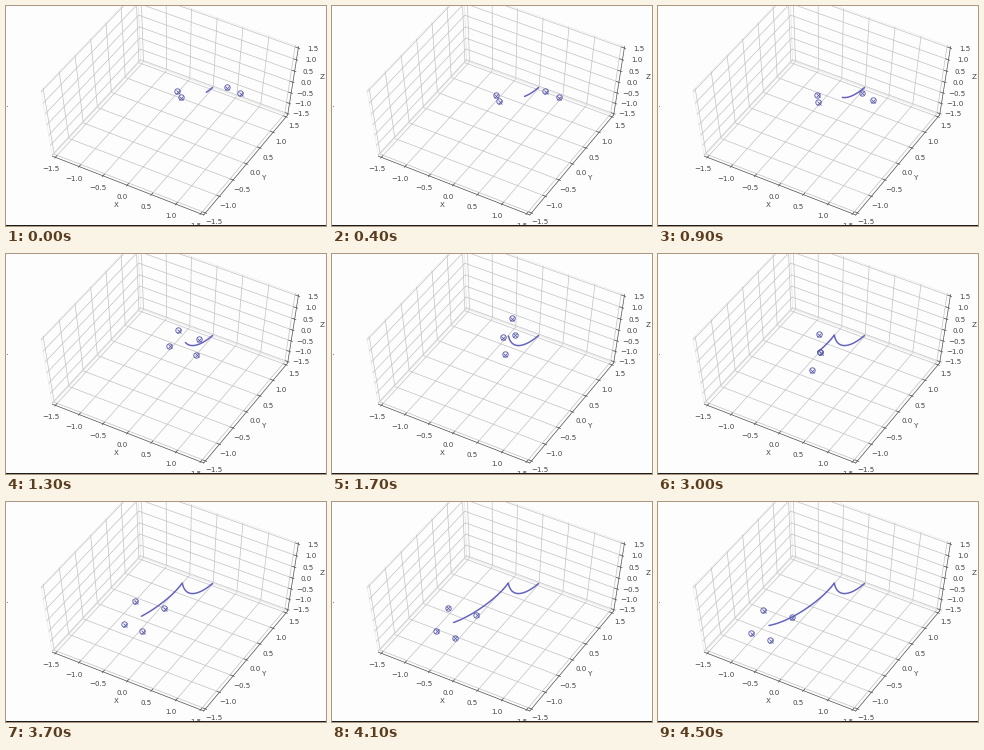
These frames come from a looping animation (320x220 px, 4.6 s). A matplotlib script:

```python
import numpy as np
import matplotlib.pyplot as plt
from matplotlib.animation import FuncAnimation

W, H, DPI = 320, 220, 100
FRAMES, STEP = 46, 100
PX = 72 / DPI                     # one pixel in points
FONT = dict(family="DejaVu Sans", size=7.15 * PX, color="#444444", ha="center")
INK, GRID, BLUE, ROTOR = "#555555", "#c2c2c2", "#6464c0", "#5c5cac"

# Camera: unit cube seen from elevation 60, azimuth -60, distance 10
ELEV, AZIM, DIST = np.radians(60), np.radians(-60), 10
RIGHT = np.array([-np.sin(AZIM), np.cos(AZIM), 0])
TOWARD = np.array([np.cos(ELEV) * np.cos(AZIM), np.cos(ELEV) * np.sin(AZIM), np.sin(ELEV)])
UP = np.cross(TOWARD, RIGHT)
E = 0.5 + 1 / 48                  # panes reach a little past the limits


def project(p):
    p = np.asarray(p, float)
    k = DIST / (DIST - p @ TOWARD)
    return 165.1 + 172.8 * k * (p @ RIGHT), 97.3 - 128.6 * k * (p @ UP)


fig = plt.figure(figsize=(W / DPI, H / DPI), dpi=DPI, facecolor="#fdfdfd")
ax = fig.add_axes([0, 0, 1, 1])
ax.set(xlim=(0, W), ylim=(H, 0))
ax.axis("off")


def path(points, color, width, z=1):
    x, y = project(points)
    ax.plot(x, y, color=color, lw=width * PX, zorder=z)


def label(p, text, va):
    ax.text(*project(p), text, va=va, zorder=4, **FONT)


# Each axis: name, position at value v, tick direction, label direction, grid line
AXES = [
    ("X", lambda v: (v, -E, -E), (0, 1, 0), (0, -1, -1),
     lambda v: [(v, -E, -E), (v, E, -E), (v, E, E)]),
    ("Y", lambda v: (E, v, -E), (-1, 0, 0), (1, 0, -1),
     lambda v: [(E, v, -E), (-E, v, -E), (-E, v, E)]),
    ("Z", lambda v: (E, E, v), (-1, 0, 0), (1, 1, 0),
     lambda v: [(E, E, v), (-E, E, v), (-E, -E, v)]),
]


def draw_box():
    for name, at, inward, out, grid in AXES:
        inward, out = np.array(inward), np.array(out)
        path(grid(-E), "#ebebeb", 0.6)
        path(grid(E), "#ebebeb", 0.6)
        path([at(-E), at(E)], INK, 0.7, 3)
        for value in np.arange(-1.5, 1.6, 0.5):
            p = np.array(at(value / 3))
            path(grid(value / 3), GRID, 0.7)
            path([p - inward / 120, p + inward / 60], INK, 0.7, 3)
            label(p + 0.059 * out, f"{value:.1f}".replace("-", "\u2212"), "top")
        label(np.array(at(0)) + 0.1284 * out, name, "center")
    # Window edge
    ax.plot([0, W], [H - 0.5] * 2, color="#1c1c1c", lw=PX, zorder=5)
    ax.plot([0.5, W - 0.5], [100, 100], "s", color="#888888", ms=PX, mew=0, zorder=5)


def ease(t, start, end):
    s = np.clip((t - start) / (end - start), 0, 1)
    return s * s * (3 - 2 * s)


def bezier(s, *pts):
    """Cubic curve through control points, one row per s."""
    a, b, c, d = np.array(pts, float)
    s = np.asarray(s)[:, None]
    r = 1 - s
    return r**3 * a + 3 * r * r * s * b + 3 * r * s * s * c + s**3 * d


# The body swoops up to a peak, then glides down to the left
START, PEAK, END = -300, 1750, 4500
TOP = (176.3, 81)


def flight(t):
    swoop = np.clip((t - START) / (PEAK - START), 0, 1)
    u = np.clip((t - PEAK) / (END - PEAK), 0, 1)
    glide = 2.2 * u**2 - 1.2 * u**3
    return np.where(t[:, None] < PEAK,
                    bezier(swoop, (206.5, 81.5), (192, 94), (179, 96), TOP),
                    bezier(glide, TOP, (166, 96), (135, 119), (111, 123.5)))


def rotors(t, body):
    """Two crossed arms that swing, fold edge-on and open again."""
    swing, fold, reopen = ease(t, 700, 1700), ease(t, 700, 2200), ease(t, 3000, 3700)
    wobble = np.exp(-((t - 2400) / 220) ** 2)
    lean = np.array([2.5 - 5 * ease(t, 900, 2400), 0])
    vec = np.array
    long_arm = (vec([-31.5, -1]) + swing * vec([35, -17])
                + wobble * vec([-20, 0]) + reopen * vec([-7, 3]))
    short_arm = (vec([-23, 5]) * (1 - fold)
                 + wobble * vec([-9, -6]) + reopen * vec([-20, 8]))
    return vec([body + lean + long_arm, body + lean - long_arm,
                body - lean + short_arm, body - lean - short_arm])


draw_box()
trail, = ax.plot([], [], color=BLUE, lw=1.5 * PX, zorder=6, solid_capstyle="round")
rings, = ax.plot([], [], "o", ms=5.4 * PX, mfc="none", mec=ROTOR, mew=0.9 * PX, zorder=7)
blades, = ax.plot([], [], "x", ms=4.4 * PX, mec=ROTOR, mew=0.8 * PX, zorder=7)


def update(n):
    now = n * STEP
    line = flight(np.arange(START, now + 1, 25))
    spots = rotors(now, line[-1])
    trail.set_data(*line.T)
    rings.set_data(*spots.T)
    blades.set_data(*(spots + 0.6).T)
    return trail, rings, blades


anim = FuncAnimation(fig, update, frames=FRAMES, interval=STEP, repeat=True, repeat_delay=0)
plt.show()
```
